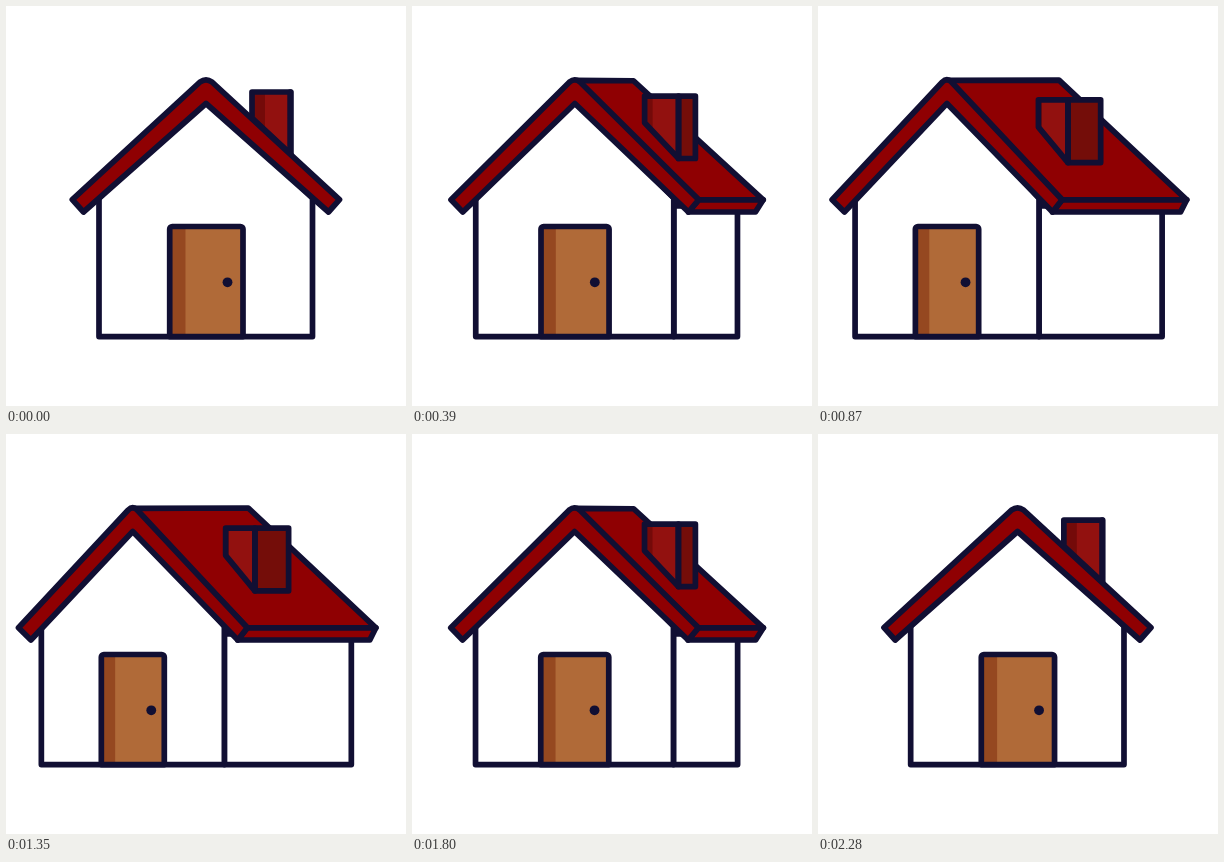
An HTML page with a canvas for the animation above (4.31 s loop, 400 by 400 pixels).

```html
<!DOCTYPE html>
<html lang="en">
<head>
<meta charset="utf-8">
<title>House turning</title>
<style>
  html, body { margin: 0; width: 100%; height: 100%; overflow: hidden; background: #fff; }
  canvas { display: block; }
</style>
</head>
<body>
<canvas id="stage" width="400" height="400"></canvas>
<script>
const ctx = document.getElementById('stage').getContext('2d');
const LOOP = 4310, STEP = 30, LAST = 2280;
const TURN = 1140, BACK = 2400;
const INK = '#110f33', ROOF = '#8f0002', WALL = '#fff';

// Cubic ease with control points (x1, 0) and (x2, 1).
function ease(x, x1, x2) {
  let lo = 0, hi = 1;
  for (let i = 0; i < 30; i++) {
    const s = (lo + hi) / 2, r = 1 - s;
    if (3 * r * r * s * x1 + 3 * r * s * s * x2 + s * s * s < x) lo = s; else hi = s;
  }
  return lo * lo * (3 - 2 * lo);
}

// 0 = seen from the front, 1 = turned to show the side.
function turnAt(ms) {
  const t = Math.min(Math.floor(ms / STEP) * STEP, LAST);
  return t < TURN
    ? ease(t / TURN, 0.27, 0.31)
    : 1 - ease((t - TURN) / (BACK - TURN), 0.84, 0.225);
}

function shape(points, fill, outlined = true) {
  ctx.beginPath();
  for (const [x, y] of points) ctx.lineTo(x, y);
  ctx.closePath();
  ctx.fillStyle = fill;
  ctx.fill();
  if (outlined) ctx.stroke();
}

const box = (l, t, r, b) => [[l, t], [r, t], [r, b], [l, b]];

function draw(p) {
  const mix = (a, b) => a + (b - a) * p;
  const apex = mix(200, 125.5);
  const left = mix(93, 34.4), right = mix(306.5, 216.9), floor = 330.6;
  const eave = mix(333.5, 239.8), eaveLow = mix(322.5, 230.3);

  ctx.clearRect(0, 0, 400, 400);
  ctx.lineWidth = 5.7;
  ctx.lineJoin = ctx.lineCap = 'round';
  ctx.strokeStyle = INK;

  // Side wall and side of the roof
  if (p > 0.01) {
    const back = mix(332, 370.5), backLow = mix(322.5, 364.5);
    shape(box(right, 200, mix(305, 346), floor), WALL);
    shape([[apex, 74.3], [mix(200, 243), mix(75.5, 74)], [back, 193.8], [eave, 193.8]], ROOF);
    shape([[eave, 193.8], [back, 193.8], [backLow, 206], [eaveLow, 206]], ROOF);
  }

  // Chimney
  const cl = mix(246, 219.2), cm = mix(284.7, 248.3), cr = mix(284.2, 282.6);
  const top = mix(86, 94.3), low = mix(148, 157);
  const slant = mix(112, 121.5), strip = mix(13, 3);
  const face = [[cl, top], [cm, top], [cm, low], [cl, slant]];
  shape(face, '#92110f', false);
  shape([[cl, top], [cl + strip, top], [cl + strip, slant + strip * 0.93], [cl, slant]], '#740a09', false);
  shape(box(cm, top, cr, low), '#740d09');
  shape(face, 'transparent');

  // Front wall
  shape([[left, floor], [left, 192], [apex, 90], [right, 192], [right, floor]], WALL);

  // Door
  const dl = mix(163.7, 94.2), dr = mix(237, 157);
  const door = new Path2D();
  door.roundRect(dl, 220.5, dr - dl, floor - 220.5, [2.5, 2.5, 0, 0]);
  ctx.fillStyle = '#b06a38';
  ctx.fill(door);
  shape(box(dl, 222, mix(179.5, 108), floor), '#954820', false);
  ctx.stroke(door);
  ctx.beginPath();
  ctx.arc(mix(221.5, 144), 276.3, 4.9, 0, Math.PI * 2);
  ctx.fillStyle = INK;
  ctx.fill();

  // Front edge of the roof
  const bend = mix(6, 4.5);
  ctx.beginPath();
  ctx.moveTo(mix(66.3, 11.6), 193.7);
  ctx.lineTo(apex - bend, 76);
  ctx.quadraticCurveTo(apex, 71.7, apex + bend, 76);
  ctx.lineTo(eave, 193.7);
  ctx.lineTo(eaveLow, 206);
  ctx.lineTo(apex, 97.5);
  ctx.lineTo(mix(77.5, 24), 206);
  ctx.closePath();
  ctx.fillStyle = ROOF;
  ctx.fill();
  ctx.stroke();
}

const start = performance.now();
function frame() {
  draw(turnAt((performance.now() - start) % LOOP));
  requestAnimationFrame(frame);
}
frame();
</script>
</body>
</html>
```
